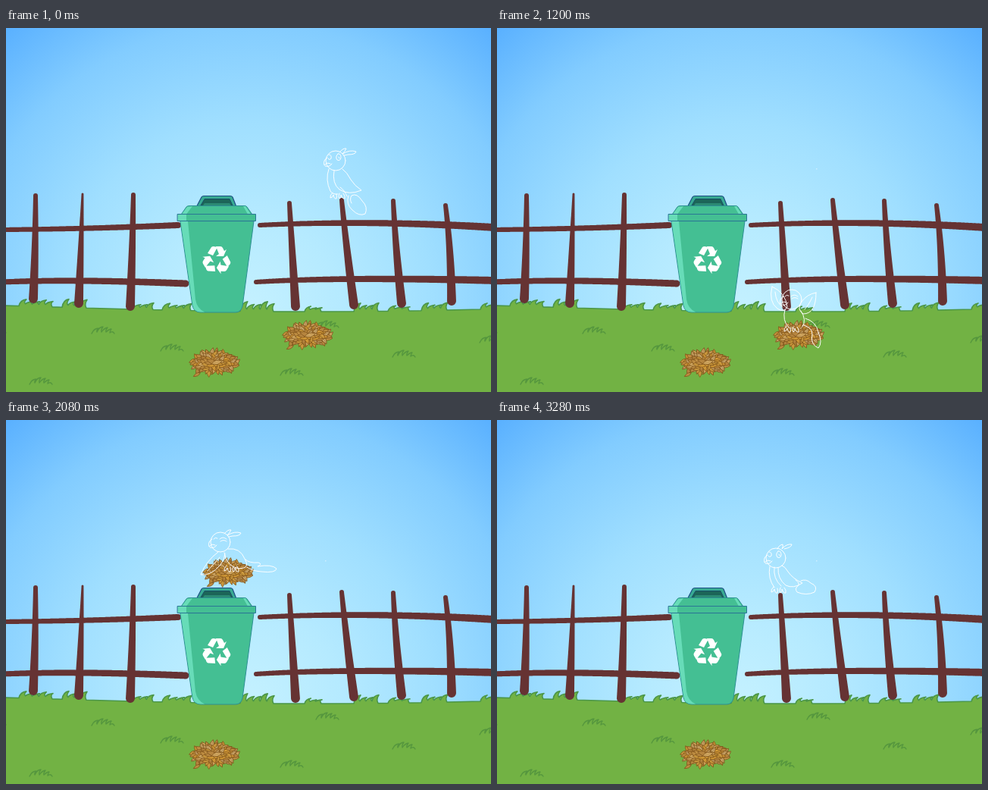
An HTML page with a canvas that plays this animation: 640 by 480 pixels, repeating every 3.76 s.

```html
<!DOCTYPE html>
<html lang="en">
<head>
<meta charset="utf-8">
<title>Bird tidying leaves</title>
<style>
  html, body { margin: 0; width: 100%; height: 100%; overflow: hidden; }
  canvas { display: block; width: 640px; height: 480px; }
</style>
</head>
<body>
<canvas id="stage" width="640" height="480"></canvas>
<script>
const ctx = document.getElementById('stage').getContext('2d');
const LOOP = 3760;

function shape(d, fill, stroke, width = 1) {
  const path = new Path2D(d);
  if (fill) { ctx.fillStyle = fill; ctx.fill(path); }
  if (stroke) { ctx.strokeStyle = stroke; ctx.lineWidth = width; ctx.stroke(path); }
}

function at(x, y, draw) {
  ctx.save();
  ctx.translate(x, y);
  draw();
  ctx.restore();
}

// ---------- sky and ground ----------
const sky = ctx.createRadialGradient(320, 370, 0, 320, 370, 490);
[[0, '#c4f1ff'], [0.25, '#b5eaff'], [0.5, '#a0dfff'], [0.77, '#82ccff'], [1, '#59b0ff']]
  .forEach(([stop, color]) => sky.addColorStop(stop, color));

const horizon = x => 366 + 8 * Math.sin(Math.PI * x / 800);

// Tufts on the horizon: left edge, width, blades, height
const tufts = [[17, 44, 5, 8], [74, 32, 4, 10], [160, 34, 4, 8], [206, 38, 4, 8],
  [309, 44, 5, 12], [394, 22, 3, 6], [459, 32, 4, 10], [504, 28, 3, 6], [548, 34, 4, 9], [626, 24, 3, 7]];

function horizonPath() {
  let d = `M-5 490 L-5 ${horizon(0)}`;
  for (const [x, width, blades, height] of tufts) {
    const step = width / blades;
    d += ` L${x} ${horizon(x)}`;
    for (let i = 0; i < blades; i++) {
      const left = x + i * step, right = left + step;
      const tall = height * (0.8 + 0.2 * Math.sin((i + 1) * 1.9));
      const base = horizon(right), tip = base - tall;
      d += ` Q${left + step * 0.2} ${tip} ${right + 1} ${tip - 1}`
         + ` Q${right - 3} ${base - 5} ${right} ${base - (i < blades - 1 ? 3 : 0)}`;
    }
  }
  return d + ' L650 371 L650 490Z';
}
const ground = horizonPath();

const scribble = 'M0 9 Q3 2 9 2 Q6 5 7 7 Q10 0 15 0 Q12 4 13 7 Q16 2 21 1 Q18 5 19 7 Q23 3 26 3 Q24 6 24 8 Q28 5 30 9';
const scribbles = [[113, 394], [204, 417], [31, 461], [362, 449], [409, 386], [510, 425], [625, 406], [-30, 393]];

function drawLand() {
  ctx.fillStyle = sky;
  ctx.fillRect(0, 0, 640, 480);
  shape(ground, '#72b244', '#4b9648', 1.6);
  for (const [x, y] of scribbles) at(x, y, () => shape(scribble, null, '#55963e', 1.3));
}

// ---------- leaf pile ----------
// Pointed leaves fan outwards from the middle, the outer ones lying underneath.
function makeLeaves() {
  let seed = 11;
  const random = () => (seed = (seed * 16807) % 2147483647) / 2147483647;
  const colors = ['#c9984a', '#d8b06a', '#bd8c45', '#d6a443', '#c9a66c', '#dca23a'];
  const leaves = [];
  const count = 90;
  for (let i = 0; i < count; i++) {
    const angle = i * 2.4, reach = Math.sqrt(1 - i / count);
    leaves.push({
      x: 36 + 29 * reach * Math.cos(angle),
      y: 22 + 13.5 * reach * Math.sin(angle),
      turn: Math.atan2(Math.sin(angle) * 0.6, Math.cos(angle)) + (random() - 0.5) * 1.5,
      size: 5 + random() * 2.5,
      color: colors[Math.floor(random() * colors.length)]
    });
  }
  leaves.push({ x: 13, y: 38, turn: -0.5, size: 5, color: colors[0] });
  return leaves;
}
const leaves = makeLeaves();

function drawPile(x, y) {
  at(x, y, () => {
    for (const leaf of leaves) at(leaf.x, leaf.y, () => {
      const s = leaf.size;
      ctx.rotate(leaf.turn);
      shape(`M${-s} 0 Q0 ${-s * 0.75} ${s} 0 Q0 ${s * 0.75} ${-s} 0Z`, leaf.color, '#80541c', 0.8);
      shape(`M${-s} 0 L${s * 0.6} 0`, null, '#a0702c', 0.5);
    });
  });
}

// ---------- fence ----------
// Each beam: start, bend, end, start width, end width
const beams = [
  [39, 221, 39, 290, 36, 357, 6, 12], [101, 219, 99, 290, 96, 363, 3, 12],
  [168, 220, 167, 290, 164, 367, 6, 12], [374, 231, 378, 300, 382, 367, 6, 12],
  [443, 227, 448, 280, 459, 365, 6, 12], [511, 228, 514, 290, 522, 363, 6, 12],
  [580, 234, 587, 290, 588, 360, 6, 12],
  [-4, 266, 110, 265, 227, 260, 6, 8], [-4, 335, 90, 331, 237, 337, 7, 9],
  [335, 260, 480, 253, 644, 263, 6, 10], [330, 335, 440, 328, 644, 333, 6, 10]
];

function drawFence() {
  ctx.fillStyle = '#663333';
  ctx.beginPath();
  for (const [x0, y0, x1, y1, x2, y2, w0, w1] of beams) {
    for (let i = 0; i <= 200; i++) {
      const t = i / 200, a = (1 - t) ** 2, b = 2 * t * (1 - t), c = t * t;
      const x = a * x0 + b * x1 + c * x2, y = a * y0 + b * y1 + c * y2;
      const radius = (w0 + (w1 - w0) * t) / 2;
      ctx.moveTo(x + radius, y);
      ctx.arc(x, y, radius, 0, 7);
    }
  }
  ctx.fill();
}

// ---------- bin ----------
function drawBin() {
  const green = '#44bf93', light = '#67dcb8', edge = '#2d8f93';
  shape('M230 255 L246 366 Q248 375 257 375 L303 375 Q310 375 312 367 L327 255Z', green, edge);
  shape('M230.5 255 L246.5 366 Q248 374.5 257 374.5 L262 374.5 Q252 370 250 358 L240 255Z', light);
  shape('M252 234.5 L258 223 Q259 221.5 261 221.5 L296 221.5 Q298 221.5 299 223 L303.5 234.5Z', '#38aa92', '#1d4f84', 1.2);
  shape('M257 234 L262 225.5 L295 225.5 L299 234Z', '#1c6558', '#174f66');
  shape('M262 231 L295 231 L297 234 L260 234Z', '#2b8a74');
  shape('M231 246 L238 236 Q239 234.5 242 234.5 L315 234.5 Q317 234.5 318 236 L325 246Z', green, edge);
  shape('M232 245.5 L239 236 L246 235 L238 245.5Z M313 235 L316 235 L323 245.5 L319 245.5Z', light);
  shape('M226.5 245.5 H329.5 V254.5 H226.5Z', green, '#2a7695');
  shape('M227 246 H238 V254 H227Z', light);
  at(278, 306, () => {
    for (let i = 0; i < 3; i++) {
      shape('M-12 -9 L-7 -17 Q-6 -18 -4 -18 L1 -17 L-5 -6Z'
        + 'M-1 -18 L5 -18 Q7 -18 8 -16 L10 -12 L13 -14 L9 -5 L-1 -5 L3 -8Z', '#fff');
      ctx.rotate(Math.PI * 2 / 3);
    }
  });
}

// ---------- bird ----------
const openEyes = 'M3 -9 Q7 -10 7 -4 Q6 1 2 -1 Q-1 -5 3 -9 M4 -5 L5 -3 M-9 -8 Q-5 -8 -6 -3 Q-8 0 -10 -3';
const closedEyes = 'M-1 -4 Q3 -8 8 -4 M0 -1 Q4 -4 8 -1 M-9 -4 Q-7 -7 -4 -5';
const head = 'M13 0 A13 13 0 1 1 -13 0 A13 13 0 1 1 13 0 M-11 -4 Q-17 -1 -15 6 L-11 3 L-7 4 M-14 7 Q-8 9 -5 4';
const longCrest = 'M5 -11 Q10 -17 14 -16 Q12 -12 9 -9 Q19 -15 27 -12 Q26 -8 16 -8 L11 -7';
const shortCrest = 'M2 -12 Q4 -17 9 -18 Q10 -15 8 -12 Q14 -19 21 -18 Q21 -14 11 -12';
const toes = 'M0 0 Q-4 4 -3 7 Q0 7 1 3 Q2 9 5 8 Q6 5 5 2 M9 1 Q7 5 9 8 Q12 7 11 3 Q13 9 16 8 Q17 4 14 1';

const hoverBody = 'M271 143 Q269 160 277 174 M290 145 Q293 153 299 160 Q304 172 300 180 Q290 186 279 179 M281 145 Q278 160 284 174';
const poses = {
  perch: {
    head: [435, 175], feet: [431, 217], eyes: openEyes, crest: longCrest,
    body: 'M426 186 Q421 200 428 215 Q431 220 438 219 M433 188 Q430 205 440 213 Q452 221 469 214 Q460 208 455 200 Q450 190 444 186'
      + 'M441 210 Q447 214 450 222 M452 221 Q448 232 457 240 Q466 249 474 245 Q478 236 470 228 Q463 217 456 221 Q453 226 456 231'
  },
  rest: {
    head: [368, 182], feet: [365, 220], eyes: openEyes, crest: shortCrest,
    body: 'M360 193 Q357 209 366 221 M371 195 Q370 209 381 218 Q391 223 403 215 Q390 209 384 200 Q380 193 376 192 M366 194 Q364 209 375 219'
      + 'M394 211 Q399 214 398 218 Q392 222 396 227 Q408 232 419 227 Q424 219 414 215 Q408 209 401 212'
  },
  peck: {
    head: [386, 360], feet: [382, 400], eyes: closedEyes, crest: longCrest,
    body: 'M378 372 Q373 390 384 402 Q394 408 405 407 M391 372 Q390 390 408 399 Q424 409 432 412 Q442 412 440 403 Q432 388 410 390 Q399 384 397 370'
      + 'M405 398 Q413 402 419 398'
  },
  wingsUp: {
    head: [374, 309], feet: [367, 344], eyes: closedEyes, crest: '',
    body: 'M348 292 Q343 312 355 321 Q364 327 368 319 Q366 300 348 292 M352 299 Q353 313 362 319'
      + 'M406 300 Q394 302 387 312 Q380 322 389 328 Q406 328 406 300 M401 306 Q396 317 391 322'
      + 'M365 322 Q361 337 370 346 M386 324 Q394 336 388 345 M392 334 Q406 338 409 352 Q415 366 409 373 Q398 368 401 355 Q401 346 390 343'
  },
  glide: {
    head: [328, 230], feet: [336, 261], eyes: closedEyes, crest: longCrest,
    body: 'M338 239 Q354 237 360 252 Q368 265 352 265 Q336 262 333 244 M325 243 Q309 255 302 273 Q315 275 328 260 Q334 252 334 245 M327 250 Q319 259 311 268'
      + 'M361 253 Q366 258 378 257 Q384 259 377 262 Q396 259 402 265 Q401 271 382 269 Q369 268 363 263'
  },
  hoverHigh: {
    head: [278, 130], feet: [272, 176], eyes: closedEyes, crest: shortCrest,
    body: hoverBody + 'M292 146 Q296 128 312 118 L329 108 Q328 128 314 142 Q304 151 293 151 M298 143 Q309 136 313 123'
      + 'M300 177 Q308 176 308 185 Q314 190 309 198 Q307 216 294 219 Q281 218 284 207 Q287 196 297 194 Q300 186 296 181'
  },
  hoverLow: {
    head: [278, 130], feet: [272, 174], eyes: closedEyes, crest: shortCrest,
    body: hoverBody + 'M291 145 Q290 133 305 125 L329 119 Q325 132 313 140 Q303 146 293 148 M297 143 Q310 138 316 128'
      + 'M298 180 Q309 176 306 184 Q312 199 303 207 Q293 216 284 212 Q279 206 285 200 Q291 193 290 184'
  }
};

function drawBird(name, dx, dy) {
  const pose = poses[name];
  const line = d => shape(d, null, '#fff', 0.95);
  at(dx, dy, () => {
    line(pose.body);
    at(...pose.head, () => line(head + pose.eyes + pose.crest));
    at(...pose.feet, () => line(toes));
  });
}

// ---------- timeline ----------
// Start time, pose, bird shift, pile shift (null once the pile is in the bin)
const steps = [
  [0, 'perch', 0, 0, [0, 0]],
  [240, 'wingsUp', 27, -50, [0, 0]],
  [400, 'rest', 16, 182, [0, 0]],
  [720, 'peck', 0, 0, [0, 0]],
  [960, 'rest', 20, 182, [0, 0]],
  [1200, 'wingsUp', 15, 49, [0, 0]],
  [1360, 'wingsUp', 0, 0, [-15, -49]],
  [1600, 'glide', 17, 40, [-41, -99]],
  [1760, 'glide', 0, 0, [-60, -137]],
  [1920, 'glide', -26, -47, [-86, -183]],
  [2080, 'glide', -45, -69, [-105, -204]],
  [2240, 'hoverLow', 0, 0, [-123, -193]],
  [2320, 'hoverHigh', 0, 0, [-123, -193]],
  [2400, 'hoverHigh', 0, 0, [-123, -173]],
  [2480, 'hoverLow', 0, 0, null],
  [2640, 'hoverHigh', 25, -2, null],
  [2720, 'hoverLow', 25, -2, null],
  [2880, 'hoverHigh', 50, -1, null],
  [2960, 'hoverLow', 50, -1, null],
  [3120, 'perch', -81, -46, null],
  [3280, 'rest', 0, 0, null]
];

function drawScene([start, pose, dx, dy, pile]) {
  drawLand();
  drawPile(239, 419);
  if (pile) drawPile(362 + pile[0], 383 + pile[1]);
  drawFence();
  drawBin();
  if (start >= 240) {
    ctx.fillStyle = start < 1200 ? '#fff' : 'rgba(255,255,255,.45)';
    ctx.fillRect(421, 185, 1.5, 1.5);
  }
  drawBird(pose, dx, dy);
}

ctx.lineJoin = ctx.lineCap = 'round';
const origin = performance.now();
let shown = null;

function tick() {
  const time = (performance.now() - origin) % LOOP;
  const step = steps.findLast(([start]) => start <= time);
  if (step !== shown) drawScene(shown = step);
  requestAnimationFrame(tick);
}
tick();
</script>
</body>
</html>
```
